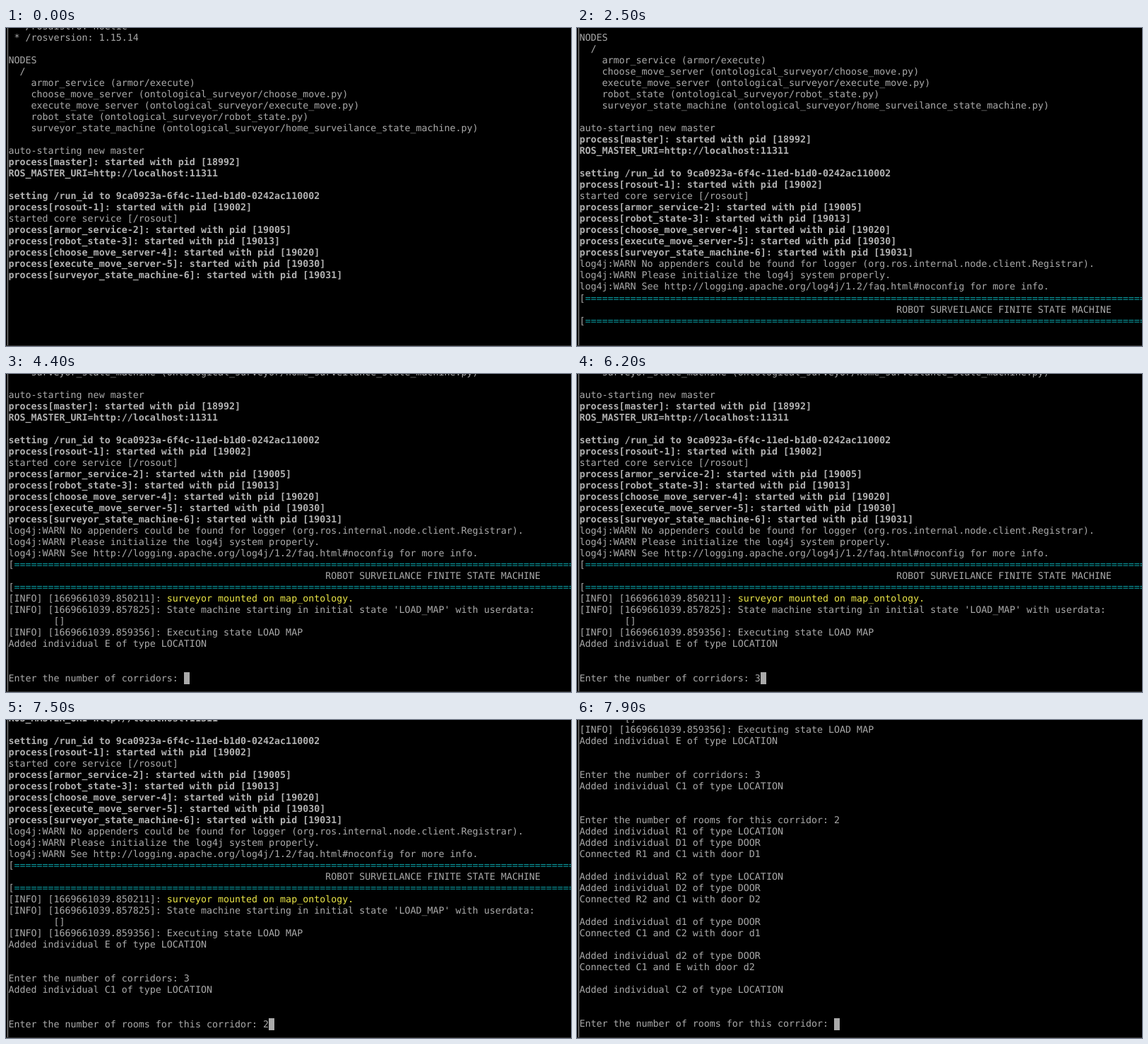
Write an HTML page that moves like this. It is 800 px wide and 450 px high and loops after 8 s.

```html
<!DOCTYPE html>
<html lang="en">
<head>
<meta charset="utf-8">
<title>Terminal session</title>
<style>
  html, body { margin: 0; width: 100%; height: 100%; overflow: hidden; background: #000; }
  #stage { position: relative; width: 800px; height: 450px; overflow: hidden; background: #000; }
  #edge { position: absolute; left: 2px; top: 0; width: 1px; height: 450px; background: #9a9a9a; }
  #foot { position: absolute; left: 0; top: 449px; width: 800px; height: 1px; background: #303030; }
  #log {
    position: absolute; left: 3.4px; color: #aaa; white-space: pre;
    font: 13.32px/16.04px "DejaVu Sans Mono", monospace;
    text-rendering: geometricPrecision;
  }
  #log div { height: 16.04px; }
  b { color: #b2b2b2; }
  .rule { color: #0a9aa0; }
  .note { color: #ece748; }
  #cursor { position: absolute; width: 8px; height: 16.5px; background: #aaa; }
</style>
</head>
<body>
<div id="stage">
  <div id="edge"></div>
  <div id="foot"></div>
  <div id="log"></div>
  <div id="cursor"></div>
</div>
<script>
const CELL = 8.02, ROW = 16.04, LEFT = 3.4, LOOP = 8000;
const TEXT_TOP = 6.8, CURSOR_TOP = 5.3;
const RULE = '[' + '='.repeat(110);

// "!" marks a bold line, "~" starts yellow text
const lines = ` * /rosdistro: noetic
 * /rosversion: 1.15.14

NODES
  /
    armor_service (armor/execute)
    choose_move_server (ontological_surveyor/choose_move.py)
    execute_move_server (ontological_surveyor/execute_move.py)
    robot_state (ontological_surveyor/robot_state.py)
    surveyor_state_machine (ontological_surveyor/home_surveilance_state_machine.py)

auto-starting new master
!process[master]: started with pid [18992]
!ROS_MASTER_URI=http://localhost:11311

!setting /run_id to 9ca0923a-6f4c-11ed-b1d0-0242ac110002
!process[rosout-1]: started with pid [19002]
started core service [/rosout]
!process[armor_service-2]: started with pid [19005]
!process[robot_state-3]: started with pid [19013]
!process[choose_move_server-4]: started with pid [19020]
!process[execute_move_server-5]: started with pid [19030]
!process[surveyor_state_machine-6]: started with pid [19031]
log4j:WARN No appenders could be found for logger (org.ros.internal.node.client.Registrar).
log4j:WARN Please initialize the log4j system properly.
log4j:WARN See http://logging.apache.org/log4j/1.2/faq.html#noconfig for more info.
${RULE}
${' '.repeat(56)}ROBOT SURVEILANCE FINITE STATE MACHINE
${RULE}
[INFO] [1669661039.850211]: ~surveyor mounted on map_ontology.
[INFO] [1669661039.857825]: State machine starting in initial state 'LOAD_MAP' with userdata:
        []
[INFO] [1669661039.859356]: Executing state LOAD MAP
Added individual E of type LOCATION


Enter the number of corridors: 3
Added individual C1 of type LOCATION


Enter the number of rooms for this corridor: 2
Added individual R1 of type LOCATION
Added individual D1 of type DOOR
Connected R1 and C1 with door D1

Added individual R2 of type LOCATION
Added individual D2 of type DOOR
Connected R2 and C1 with door D2

Added individual d1 of type DOOR
Connected C1 and C2 with door d1

Added individual d2 of type DOOR
Connected C1 and E with door d2

Added individual C2 of type LOCATION


Enter the number of rooms for this corridor: `.split('\n');

// [time, cursor line, cursor column]
const steps = [
  [0, 23, 0], [200, 26, 0], [1300, 29, 0],
  [3200, 36, 31], [5800, 36, 32],
  [6400, 40, 45], [7200, 40, 46],
  [7700, 43, 0], [7800, 52, 0], [7900, 58, 45]
];
// Times at which the cursor toggles, starting hidden
const blinks = [500, 1100, 1700, 2300, 3000, 3600, 4200, 4800, 5400, 7000, 7200];

const log = document.getElementById('log');
const cursor = document.getElementById('cursor');

const markup = s => s
  .replace(/^!(.*)/, '<b>$1</b>')
  .replace(/~(.*)/, '<span class="note">$1</span>')
  .replace(/={9,}/, '<span class="rule">$&</span>');

let shown = null;
function show(step) {
  const [, line, col] = step;
  const scroll = Math.max(1, line - 26);
  const text = lines.slice(0, line).map(markup);
  text.push(lines[line].slice(0, col));
  log.innerHTML = text.map(s => `<div>${s}</div>`).join('');
  log.style.top = TEXT_TOP - scroll * ROW + 'px';
  cursor.style.left = LEFT + col * CELL + 'px';
  cursor.style.top = CURSOR_TOP + (line - scroll) * ROW + 'px';
  shown = step;
}

function draw() {
  const t = performance.now() % LOOP;
  const step = steps.filter(s => s[0] <= t).pop();
  if (step !== shown) show(step);
  const on = blinks.filter(b => b <= t).length % 2;
  cursor.style.visibility = on ? 'visible' : 'hidden';
  requestAnimationFrame(draw);
}
draw();
</script>
</body>
</html>
```
